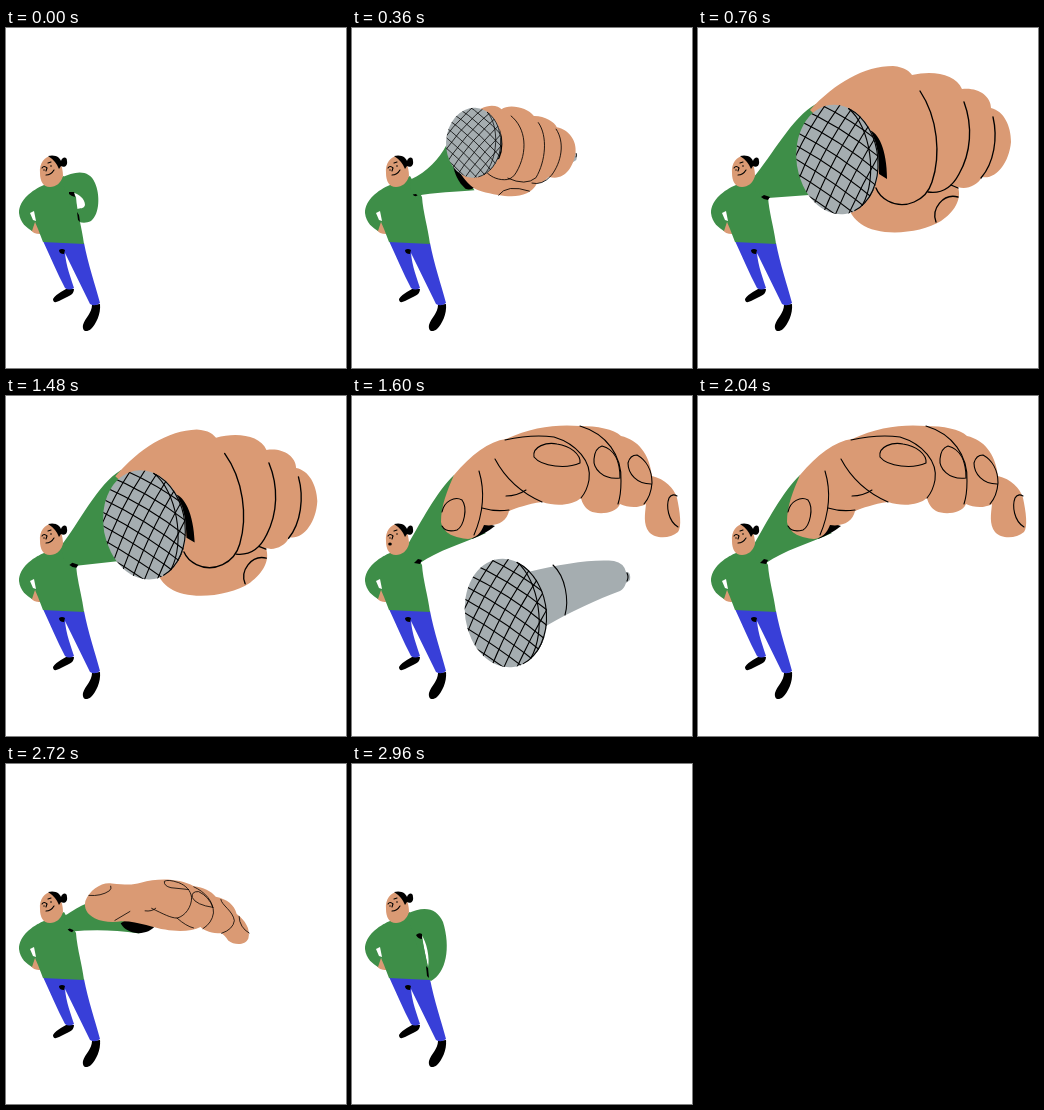
An HTML page for the animation above (3.04 s loop, 340 by 340 pixels).

```html
<!DOCTYPE html>
<html lang="en">
<head>
<meta charset="utf-8">
<title>Mic drop</title>
<style>
  html, body { margin: 0; width: 100%; height: 100%; overflow: hidden; background: #fff; }
  svg { display: block; width: 100%; height: 100%; }
  .skin { fill: #da9a74; }
  .green { fill: #3e8e48; }
  .blue { fill: #383fd8; }
  .gray { fill: #a5adb0; }
  .line { fill: none; stroke: #000; stroke-width: 1.1; stroke-linecap: round; stroke-linejoin: round; }
  #fist > .line { stroke-width: 1.35; }
</style>
</head>
<body>
<svg id="stage" viewBox="0 0 340 340"></svg>
<script>
const LOOP = 3040;
const stage = document.getElementById('stage');

const shape = (cls, d) => `<path class="${cls}" d="${d}"/>`;
const line = d => shape('line', d);
const group = (id, body) => `<g id="${id}" visibility="hidden">${body}</g>`;

// Wire mesh ball of the microphone, drawn around its own centre.
function meshHead(x, y, rx, ry, turn) {
  const mesh = [];
  for (let k = -6; k <= 6; k++) {
    const p = k * 11.5;
    mesh.push(`M-70 ${p + 3}Q0 ${p * 1.12 - 8} 70 ${p + 3}`);
  }
  const wires = angle => `<path class="line" transform="rotate(${angle})" d="${mesh.join('')}"/>`;
  return `<g transform="translate(${x} ${y}) rotate(${turn}) scale(${rx / 41} ${ry / 55})">
    <ellipse class="gray" rx="41" ry="55"/>
    <g clip-path="url(#ball)">${wires(42)}${wires(-54)}</g>
    ${line('M18 -49C37 -29 38 24 18 49')}${line('M18 -49A41 55 0 0 1 10 53')}</g>`;
}

const armpit = shape('', 'M63 169L66 167L72 169L70 172Q66 172 63 169Z');

const poses = {
  tucked:
    `<path class="green" fill-rule="evenodd" d="M55 150C69 143 83 141 89 155C94 166 94 186 85 193C81 195 77 195 73 194L66 185L60 165Z
      M68 165C73 166 79 171 79 177C78 181 74 180 71 181Z"/>` +
    shape('', 'M63 164L68 164L69 169Q65 168 63 166Z') +
    shape('', 'M71 184L73 187L74 194L72 192Z'),

  hanging:
    `<path class="green" fill-rule="evenodd" d="M55 150C72 141 85 144 91 158C99 184 94 209 79 217L75 214L60 165Z
      M69 170C75 178 78 195 76 203Z"/>` +
    shape('', 'M64 171Q67 168 70 170L70 175Q66 175 64 171Z') +
    shape('', 'M74 202L76 204L77 214L75 212Z'),

  raised:
    shape('green', 'M55 150C74 133 84 110 88 88L146 137C125 146 90 158 69 171L58 164Z') +
    shape('', 'M64 170L68 168L71 169L69 171Q66 172 64 170Z') +
    shape('', 'M105 111L145 133Q140 140 133 139C120 133 112 124 105 111Z') +
    shape('gray', 'M264 40Q271 44 271 51L266 57Z') + line('M268 42Q270 44 269.5 47') +
    shape('skin', `M119 23C130 12 142 12 147 15C155 4 182 1 194 10C208 5 225 9 230 15
      C248 13 263 24 267 42C270 64 264 85 241 86C237 94 234 98 228 100
      C225 120 205 130 180 133C163 136 148 136 143 134C130 129 118 121 112 112Z`) +
    line('M163 20C189 30 202 61 195 94Q193 104 186 108C175 113 164 112 156 108') +
    line('M203 17C222 31 230 66 224 93Q214 109 186 106') +
    line('M230 18C248 32 252 60 244 83Q236 101 221 102') +
    line('M181 133Q187 114 221 114') +
    shape('', 'M153 42Q168 62 166 83L158 92Z') +
    meshHead(124, 73, 39.5, 50, -15),

  fist:
    shape('green', 'M55 150C74 128 94 89 118 76L132 120L111 167L70 170L58 164Z') + armpit +
    shape('skin', `M112 82C137 55 166 38 195 38C207 39 212 44 214 47C235 42 258 46 264 61
      C280 59 293 68 293 80C306 83 313 98 313 114C311 136 297 152 284 149
      C279 158 268 162 260 159C264 172 256 184 243 193C222 206 181 209 163 196
      C156 191 152 185 150 178L130 100Z`) +
    line('M222 63C240 90 243 127 234 154C228 173 207 182 190 173Q181 168 178 160') +
    line('M266 74C275 98 273 125 261 146Q250 167 230 164') +
    line('M295 89C300 110 296 135 283 150M253 157L260 160') +
    line('M238 194C233 181 245 165 260 169') +
    shape('', 'M171 102C180 104 189 121 189 151L181 146Q182 126 171 102Z') +
    meshHead(139.5, 131.5, 41, 55, -8),

  open:
    shape('green', 'M55 150C69 126 85 95 102 79L96 127L134 137C112 147 85 155 68 167L58 164Z') +
    shape('', 'M62 167L66 163L70 164L68 168Z') +
    shape('', 'M120 143L130 126L143 130Q133 138 120 143Z') +
    shape('skin', `M102 79C119 59 137 45 154 43C180 31 205 28 228 30C245 30 262 33 269 40
      C286 44 297 57 300 80C313 83 322 92 325 102C328 116 330 131 326 136
      C318 143 303 143 297 136C291 128 293 118 294 108C285 113 275 111 268 108
      C264 118 246 119 238 115C233 112 230 107 229 102C221 109 205 111 190 106
      C175 108 165 112 157 115C155 125 145 131 132 129C129 137 124 142 116 143
      C104 142 91 138 89 126C89 110 95 95 102 79Z`) +
    line('M90 116C92 105 103 100 110 104C116 112 112 130 105 134Q94 137 90 130') +
    line('M127 75C133 95 131 118 122 139M143 63C152 80 165 95 190 106') +
    line('M154 100Q165 100 174 94M130 112C140 115 150 115 157 114') +
    line('M228 67C215 73 190 71 182 61C180 50 195 46 205 48C218 50 229 58 228 67') +
    line('M153 44Q180 38 202 41C225 48 240 66 237 84Q235 95 229 102') +
    line('M228 30C255 38 270 60 269 85Q269 99 266 108') +
    line('M268 82C250 84 241 72 242 63Q243 52 250 50C262 53 268 65 268 82') +
    line('M299 88C285 88 276 78 276 67Q278 59 285 59C294 64 300 74 300 87Q299 100 292 108') +
    line('M326 131C316 125 314 110 317 102Q320 97 325 100'),

  flat:
    shape('green', 'M55 150C67 141 75 132 86 127L120 138L168 150V160C130 160 100 164 69 171L58 164Z') + armpit +
    shape('', 'M139 149L150 140L190 145C185 156 171 161 160 160C150 159 143 155 139 149Z') +
    shape('skin', `M83 124C87 106 104 92 118 93C140 92 149 91 160 86C185 75 215 72 238 80
      C252 80 264 83 272 91C289 92 301 99 306 112C319 119 330 131 328 145
      C325 156 309 158 299 152C295 147 291 145 288 143C275 145 263 143 256 138
      C245 146 225 150 205 149C190 150 163 142 140 146C126 150 112 151 100 147
      C88 143 82 135 83 124Z`) +
    line('M87 115Q105 114 116 104Q119 100 117 97M130 146L150 130M172 126Q182 126 187 120') +
    line('M181 121C200 127 210 131 220 130C232 125 239 110 237 97C234 87 227 81 215 78Q199 75 194 79Q194 86 205 87L231 86') +
    line('M220 130Q235 140 246 141M238 81C255 86 270 98 272 115Q272 130 260 140') +
    line('M270 107Q245 107 238 97Q235 88 246 87Q262 92 270 107') +
    line('M280 94C282 102 300 108 304 122Q304 135 288 143M310 115Q313 131 328 137')
};

const figure =
  shape('', 'M60 261L68 261Q68 266 63 268L53 273Q47 276 47 271Q49 267 60 261Z') +
  shape('', 'M86 277L94 276C95 286 90 296 85 301C80 305 76 303 77 297C79 290 86 285 86 277Z') +
  shape('blue', 'M37 213L78 215C82 236 89 256 94 275Q89 279 84 276L59 225C60 238 65 250 68 260Q63 263 59 260C51 245 45 230 37 213Z') +
  shape('', 'M53 222Q56 220 59 222L58 226Q53 226 53 222Z') +
  shape('skin', 'M28 193L35 200L34 206Q27 206 25 202Z') +
  `<path class="green" fill-rule="evenodd" d="M38 157C26 162 13 172 13 185C14 195 21 200 26 203L29 194L32 201L37 214L78 216C76 200 71 184 70 169L58 148Z
    M24 185L28 183L30 193L27 192Z"/>`;

const head =
  shape('skin', 'M34 145C33 135 39 128 46 128C53 129 57 138 57 148C55 155 50 159 44 159C37 159 34 153 34 145Z') +
  shape('', 'M42 128C50 126 54 130 55 133C56 129 61 128 61 133C62 138 58 140 55 138L53 141Q50 133 42 128Z') +
  `<circle cx="45" cy="138" r=".8"/><circle cx="38" cy="142" r=".7"/>` +
  line('M42 135L45 134M36 140Q38 137 41 140L40 143');

const mic =
  shape('gray', 'M176 176C210 168 240 163 262 165Q272 167 274 176Q279 175 278 184L274 187Q272 193 268 195C246 203 220 215 194 230Z') +
  line('M201 169C214 181 217 205 213 219M275 177Q277 181 275 185') +
  meshHead(154, 217, 41, 54.5, -8);

stage.innerHTML =
  `<clipPath id="ball"><ellipse rx="41" ry="55"/></clipPath>` + figure +
  Object.entries(poses).map(([id, body]) => group(id, body)).join('') + head +
  group('smile', line('M40 147Q45 147 48 142')) +
  group('gasp', '<ellipse cx="38" cy="148" rx="1.8" ry="1.5"/>') +
  group('mic', mic) + group('trail', line(''));

// [start ms, arm pose, turn in degrees and scale about the shoulder]
const steps = [
  [0, 'tucked'], [80, 'hanging'], [160, 'raised', 62, .28], [240, 'raised', 38, .48],
  [320, 'raised', 18, .7], [440, 'raised', 6, .9], [520, 'raised'],
  [600, 'fist', -4], [680, 'fist', -1.5], [760, 'fist'],
  [1480, 'fist', -2], [1520, 'open', 3, .98], [1560, 'open'], [2480, 'flat'],
  [2640, 'flat', -10, .92], [2720, 'flat', 8, .68], [2800, 'flat', 38, .44],
  [2880, 'flat', 66, .28], [2960, 'hanging']
];
const parts = Object.fromEntries([...stage.querySelectorAll('g[id]')].map(g => [g.id, g]));
const show = (id, on) => parts[id].setAttribute('visibility', on ? 'visible' : 'hidden');

function draw(time) {
  const [, pose, turn = 0, scale = 1] = steps.findLast(step => step[0] <= time);
  for (const id in poses) show(id, id === pose);
  parts[pose].setAttribute('transform', `translate(62 158) rotate(${turn}) scale(${scale}) translate(-62 -158)`);

  const dropping = time >= 1520 && time < 2040;
  show('gasp', dropping);
  show('smile', !dropping);

  const tick = Math.floor(time / 40) - 40;
  show('mic', dropping && tick < 6);
  parts.mic.setAttribute('transform', `translate(0 ${27 * tick + 1.2 * tick * tick})`);

  show('trail', dropping && tick >= 6);
  const end = 275 + (10 - tick) * 16;
  parts.trail.firstChild.setAttribute('d', [173, 210, 248, 284].map(x => `M${x} 246V${end - 1}`).join(''));
}

const start = performance.now();
function frame() {
  draw((performance.now() - start) % LOOP);
  requestAnimationFrame(frame);
}
frame();
</script>
</body>
</html>
```
